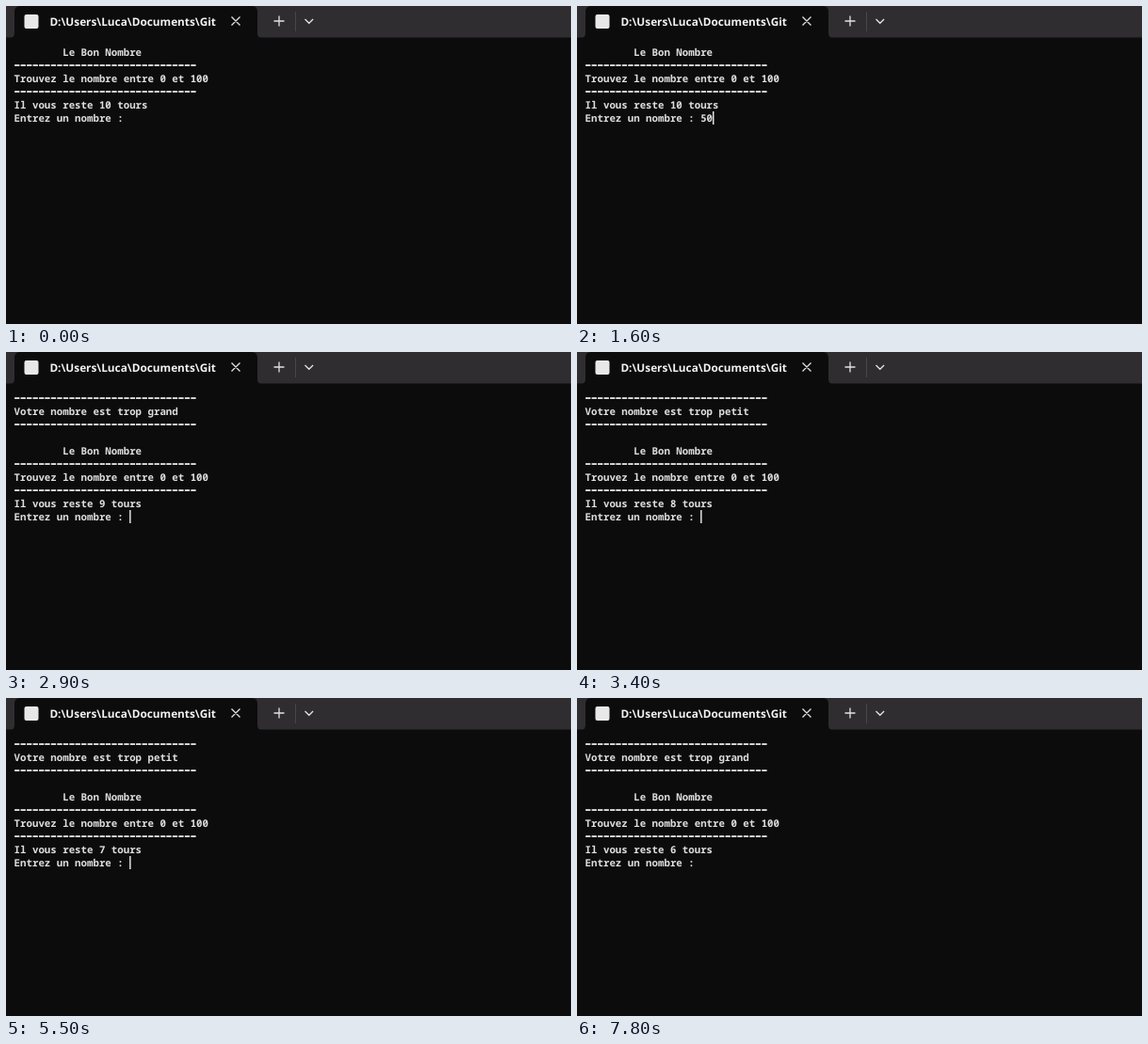
An HTML page for the animation above (8000 ms loop, 600 by 338 pixels).

```html
<!DOCTYPE html>
<html lang="fr">
<head>
<meta charset="utf-8">
<title>Terminal</title>
<style>
  html, body { margin: 0; width: 100%; height: 100%; overflow: hidden; background: #0c0c0c; }
  svg { display: block; width: 600px; height: 338px; }
  text { white-space: pre; text-rendering: geometricPrecision; }
  .title { font: 700 11.8px "Open Sans", "Noto Sans", sans-serif; fill: #f2f2f2; }
  #screen text { font: 700 10.75px "Noto Sans Mono", "DejaVu Sans Mono", monospace; fill: #dedede; }
  #screen .rule { font-weight: 400; stroke: #dedede; stroke-width: 1; }
  .icon { fill: none; stroke: #e2e2e2; stroke-width: 1.3; }
</style>
</head>
<body>
<svg viewBox="0 0 600 338">
  <defs>
    <clipPath id="tabClip"><rect x="40" y="0" width="183.5" height="33"/></clipPath>
  </defs>
  <rect width="600" height="338" fill="#0c0c0c"/>
  <rect width="600" height="33.5" fill="#2f2d30"/>
  <path d="M4 34Q9 34 9 29V6Q9 0 15 0H261Q267 0 267 6V29Q267 34 272 34Z" fill="#0c0c0c"/>
  <rect x="19.5" y="9" width="15" height="15" rx="2" fill="#e8e8e8"/>
  <g clip-path="url(#tabClip)"><text class="title" x="46.4" y="21">D:\Users\Luca\Documents\Git</text></g>
  <path class="icon" d="M239.5 11.5l9 9m0-9l-9 9M284.5 16h11M290 10.5v11M317.5 14l4.3 4.3 4.3-4.3"/>
  <path d="M307.5 6v21" stroke="#48464a"/>
  <g id="screen"></g>
  <rect id="cursor" width="1.4" height="14" fill="#f0f0f0"/>
</svg>
<script>
const LOOP = 8000, LEFT = 8.6, TOP = 42, CELL = 6.45, ROW = 14, BASE = 11.2;
const RULE = "–".repeat(30), PROMPT = "Entrez un nombre : ";

// Each turn: hint about the last guess, turns left
const turns = [["", 10], ["grand", 9], ["petit", 8], ["petit", 7], ["grand", 6]];

// Each step: start in ms, turn, typed digits, cursor visible
const steps = [
  [0, 0, "", 0], [400, 0, "", 1], [1000, 0, "", 0], [1500, 0, "5", 1], [1600, 0, "50", 1],
  [1800, 1, "", 1], [2400, 1, "", 0], [2900, 1, "", 1], [3100, 1, "2", 1], [3200, 1, "25", 1],
  [3400, 2, "", 1], [4000, 2, "", 0], [4600, 2, "", 1], [5100, 2, "4", 1], [5300, 2, "40", 1],
  [5500, 3, "", 1], [6100, 3, "", 0], [6700, 3, "", 1], [6900, 3, "4", 1], [7000, 3, "45", 1],
  [7200, 4, "", 1], [7800, 4, "", 0]
];

const screenEl = document.getElementById("screen");
const cursor = document.getElementById("cursor");
const rows = Array.from({ length: 10 }, () => {
  const el = document.createElementNS("http://www.w3.org/2000/svg", "text");
  el.setAttribute("x", LEFT);
  return screenEl.appendChild(el);
});

function linesFor([hint, left], typed) {
  const head = hint ? [RULE, "Votre nombre est trop " + hint, RULE, ""] : [];
  return [...head, " ".repeat(8) + "Le Bon Nombre", RULE, "Trouvez le nombre entre 0 et 100", RULE,
    `Il vous reste ${left} tours`, PROMPT + typed];
}

function show([, turn, typed, visible]) {
  const lines = linesFor(turns[turn], typed);
  rows.forEach((el, i) => {
    const line = lines[i] || "", isRule = line === RULE;
    el.textContent = line;
    el.classList.toggle("rule", isRule);
    el.setAttribute("y", TOP + i * ROW + BASE - (isRule ? 1 : 0));
  });
  cursor.setAttribute("x", LEFT + CELL * (PROMPT.length + typed.length));
  cursor.setAttribute("y", TOP + ROW * (lines.length - 1));
  cursor.setAttribute("opacity", visible);
}

const start = performance.now();
let current;
function tick() {
  const t = Math.max(0, performance.now() - start) % LOOP;
  const step = steps.findLast(s => s[0] <= t);
  if (step !== current) show(current = step);
  requestAnimationFrame(tick);
}
tick();
</script>
</body>
</html>
```
